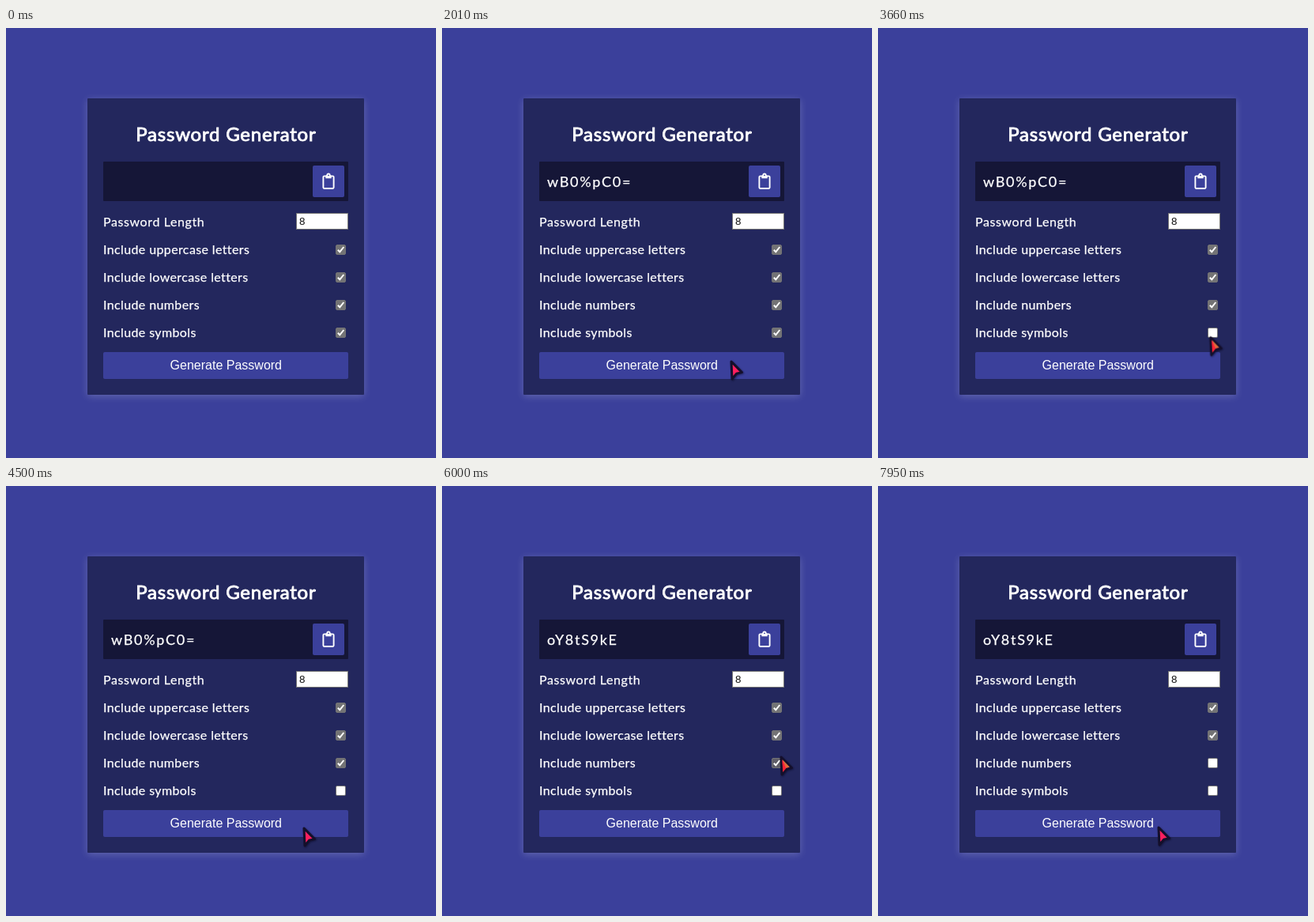
Recreate the animation shown at these times as an HTML page. Size 544 px wide and 544 px high, loop 8 s.

```html
<!DOCTYPE html>
<html lang="en">
<head>
<meta charset="utf-8">
<title>Password Generator</title>
<style>
  html, body { margin: 0; width: 100%; height: 100%; overflow: hidden; background: #3b409b; }
  svg { display: block; width: 100vw; height: 100vh; }
  text { fill: #fff; font-family: Lato, "Open Sans", sans-serif; }

  .card { fill: #23275d; filter: drop-shadow(0 2px 5px rgba(255, 255, 255, .2)); }
  .title { font-size: 24px; letter-spacing: .78px; text-anchor: middle; stroke: #fff; stroke-width: .9; }
  .label { font-size: 16px; letter-spacing: .38px; stroke: #fff; stroke-width: .25; }
  .password { font-size: 18px; letter-spacing: 1.7px; stroke: #fff; stroke-width: .25; }
  .button { font: 16px Arial, "Liberation Sans", sans-serif; text-anchor: middle; }
  .number { font: 13.333px Arial, "Liberation Sans", sans-serif; fill: #111; }
  .box { fill: #737375; }
  .tick { fill: none; stroke: #fff; stroke-width: 2; }

  .first, .second, .symbols *, .numbers *, .link { animation: 8s step-end infinite; }
  .first { animation-name: first; }
  .second { animation-name: second; }
  .symbols .box { animation-name: symbols-box; }
  .symbols .tick { animation-name: symbols-tick; }
  .numbers .box { animation-name: numbers-box; }
  .numbers .tick { animation-name: numbers-tick; }
  .link { animation-name: link; }

  @keyframes first { 0% { opacity: 0 } 16.5% { opacity: 1 } 57.5%, 100% { opacity: 0 } }
  @keyframes second { 0% { opacity: 0 } 57.5%, 100% { opacity: 1 } }
  @keyframes symbols-box { 0% { fill: #737375 } 32.5% { fill: #5f5d68 } 39.9%, 100% { fill: #fff } }
  @keyframes symbols-tick { 0% { opacity: 1 } 39.9%, 100% { opacity: 0 } }
  @keyframes numbers-box {
    0%, 78% { fill: #737375 } 73.5%, 86% { fill: #5f5d68 } 92.5%, 100% { fill: #fff }
  }
  @keyframes numbers-tick { 0% { opacity: 1 } 92.5%, 100% { opacity: 0 } }
  @keyframes link {
    0%, 46.5%, 78%, 94% { opacity: 0 } 32.5%, 73.5%, 86% { opacity: 1 } 100% { opacity: 0 }
  }

  .cursor {
    filter: drop-shadow(1px 1px 1px rgba(0, 0, 20, .45));
    animation: move 8s ease-in-out infinite;
  }
  @keyframes move {
    0% { transform: translate(560px, 285px); animation-timing-function: step-end }
    .375% { transform: translate(522px, 305px); animation-timing-function: ease-out }
    6.75%, 21% { transform: translate(361px, 426px) }
    25.1%, 26.8% { transform: translate(364px, 420px) }
    32% { transform: translate(422px, 378px) }
    34.1%, 45% { transform: translate(420px, 388px); animation-timing-function: ease-in }
    48.4% { transform: translate(403px, 409px); animation-timing-function: ease-out }
    52.1%, 67.5% { transform: translate(375px, 431px) }
    75% { transform: translate(427px, 341px); animation-timing-function: linear }
    77.6% { transform: translate(427px, 333px); animation-timing-function: linear }
    78%, 81.4% { transform: translate(427px, 324px) }
    83.5% { transform: translate(425px, 308px) }
    87.5% { transform: translate(419px, 366px) }
    88.8%, 92.6% { transform: translate(421px, 356px) }
    97.5% { transform: translate(343px, 442px) }
    99.3%, 100% { transform: translate(353px, 430px) }
  }

  .spark { fill: #ff2638; opacity: 0; animation: spark 8s ease-out infinite; }
  @keyframes spark {
    0% { opacity: 1; transform: none }
    .5% { opacity: 1 }
    5.5%, 100% { opacity: 0; transform: translate(var(--x), var(--y)) scale(.4) }
  }
</style>
</head>
<body>
<svg viewBox="0 0 544 544">
  <rect class="card" x="103" y="89" width="350" height="375" rx="1"/>
  <text class="title" x="278.4" y="143">Password Generator</text>

  <rect x="123" y="169" width="310" height="50" rx="1" fill="#151637"/>
  <text class="password first" x="133" y="201">wB0%pC0=</text>
  <text class="password second" x="133" y="201">oY8tS9kE</text>

  <rect x="388" y="174" width="40" height="40" rx="2" fill="#3b409b"/>
  <g fill="#fff">
    <rect x="401.4" y="187.4" width="13.2" height="15.6" rx="1.2" fill="none" stroke="#fff" stroke-width="1.9"/>
    <rect x="404.3" y="186.5" width="7.4" height="3.8" rx=".5"/>
    <circle cx="408" cy="186" r="2.6"/>
    <circle cx="408" cy="186.3" r=".9" fill="#3b409b"/>
  </g>

  <text class="label" x="123" y="251" style="letter-spacing:.6px">Password Length</text>
  <rect x="367.5" y="234.5" width="65" height="20" fill="#fff" stroke="#767676"/>
  <text class="number" x="371" y="249">8</text>

  <g id="options"></g>

  <rect x="123" y="410" width="310" height="34" rx="2" fill="#3b409b"/>
  <text class="button" x="278.3" y="432">Generate Password</text>

  <g class="cursor">
    <path d="M2 2L15.4 15.6L8.6 17.2L3 24Z" fill="#ff1f5f" stroke="#140f2b" stroke-width="3" stroke-linejoin="round"/>
    <g class="link">
      <path d="M3.4 5L8 16.4L4.2 21Z" fill="#ff2233"/>
      <path d="M3.6 5L12.8 14.6L8.2 15.8Z" fill="#dc6c38"/>
    </g>
  </g>
  <g id="bursts"></g>
</svg>
<script>
  const NS = "http://www.w3.org/2000/svg";

  function add(parent, tag, attrs, text = "") {
    const el = document.createElementNS(NS, tag);
    for (const key in attrs) el.setAttribute(key, attrs[key]);
    el.textContent = text;
    return parent.appendChild(el);
  }

  const options = document.getElementById("options");
  ["uppercase letters", "lowercase letters", "numbers", "symbols"].forEach((name, i) => {
    const y = 274 + i * 35;
    add(options, "text", { class: "label", x: 123, y: y + 12 }, "Include " + name);
    const check = add(options, "g", { class: name, transform: `translate(417 ${y})` });
    add(check, "rect", { class: "box", x: .5, y: .5, width: 12, height: 12, rx: 1.5, stroke: "#737375" });
    add(check, "path", { class: "tick", d: "M2.8 6.8L5.3 9.3L10.3 3" });
  });

  // Click time in seconds, then the pointer tip
  const clicks = [[1.22, 362, 426], [3.09, 421, 388], [4.53, 376, 432], [7.32, 422, 357]];
  const bursts = document.getElementById("bursts");
  for (const [time, x, y] of clicks) {
    const burst = add(bursts, "g", { transform: `translate(${x} ${y})` });
    for (let i = -2; i <= 2; i++) {
      add(burst, "path", {
        class: "spark",
        d: "M0-4L1.2-1.2L4 0L1.2 1.2L0 4L-1.2 1.2L-4 0L-1.2-1.2Z",
        style: `--x:${i * 8}px;--y:${i * i * 6 - 42}px;animation-delay:${time}s`
      });
    }
  }
</script>
</body>
</html>
```
